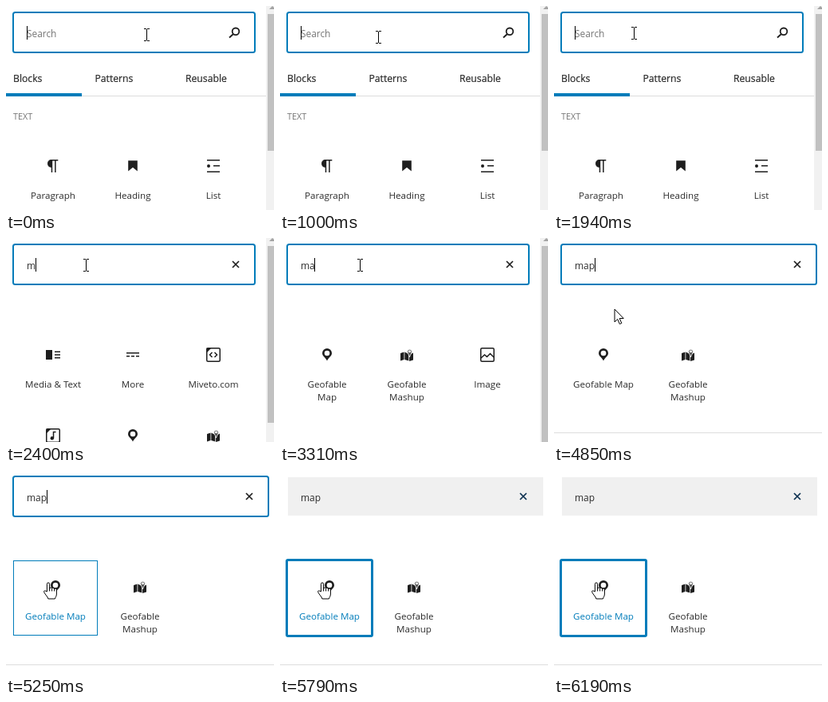
Recreate the animation shown at these times as an HTML page. Size 336 by 255 pixels, loop 6.99 s.

```html
<!DOCTYPE html>
<html lang="en">
<head>
<meta charset="utf-8">
<title>Block search</title>
<style>
  html, body { margin: 0; width: 100%; height: 100%; overflow: hidden; background: #fff; }
  svg { display: block; width: 336px; height: 255px; }
  text { font: 11.6px "Open Sans", "Noto Sans", sans-serif; fill: #2c2c2c; }
  .label { text-anchor: middle; }
  .input { font-size: 11.9px; }
  .tab { font-size: 12.2px; stroke: #1e1e1e; stroke-width: .2px; }
  .line { fill: none; stroke: #1e1e1e; stroke-width: 1.5px; }
  .hover .label { fill: #007cba; }
</style>
</head>
<body>
<svg id="stage" viewBox="0 0 336 255"></svg>
<script>
const LOOP = 6990, STEP = 67;
const TYPED = [[2400, "m"], [3000, "ma"], [3710, "map"]];
const CARET_X = [26, 37, 43, 51];
const CARET_OFF = [[330, 860], [1410, 1940], [4240, 4770], [5590, LOOP]];
const POINTER_LEAVES = 4450;
// time, x, y of the pointer's hot spot
const POINTER = [
  [0, 176, 36], [600, 176, 36], [1000, 123, 39], [1340, 101, 35], [1480, 100, 34],
  [POINTER_LEAVES, 100, 34], [5180, 54, 140], [5250, 53, 141], [LOOP, 53, 141]
];

const frame = '<rect class="line" x="3.75" y="3.75" width="16.5" height="16.5" rx="1.5"/>';
const foldedFrame = frame + '<path d="M3.5 3.5h6l-6 6z"/>';
const icons = {
  paragraph: '<path d="M18.3 4H9.9v-.1l-.9.2c-2.3.4-4 2.4-4 4.8s1.7 4.4 4 4.8l.7.1V20h1.5V5.5h2.9V20h1.5V5.5h2.7z"/>',
  heading: '<path d="M6.2 5.2v13.4l5.8-4.8 5.8 4.8V5.2z"/>',
  list: '<path d="M4 4h16v1.5H4zM12 11h8v1.5h-8zM4 18.5h16V20H4z"/><circle cx="6" cy="12" r="2"/>',
  media: '<path d="M3 6h8v12H3zM14 7.5h7V9h-7zM14 11.3h7v1.5h-7zM14 15h7v1.5h-7z"/>',
  more: '<path d="M4 9h16v1.5H4zM4 13h4v1.5H4zM10 13h4v1.5h-4zM16 13h4v1.5h-4z"/>',
  embed: foldedFrame + '<path class="line" d="M10.5 9l-3 3 3 3M13.5 9l3 3-3 3"/>',
  audio: foldedFrame + '<path class="line" d="M12.5 15.5v-8h3"/><circle cx="10.8" cy="15.3" r="2.2"/>',
  image: frame + '<path class="line" d="M4 16l4.5-4 3 2.5 4-4 4.5 4.5"/>',
  pin: '<path fill-rule="evenodd" d="M12 4a6 6 0 0 0-6 6c0 4 4 5 6 9.500 2-4.500 6-5.500 6-9.500a6 6 0 0 0-6-6zm0 2.700a3.300 3.300 0 1 1 0 6.600 3.300 3.300 0 0 1 0-6.600z"/>',
  map: '<path d="M4 10l4.500-1.500v9.500L4 19.500zM9.300 8.500l5 2.500v8.500l-5-1.500zM15.100 12l4.900-2.500v9L15.100 20z"/>' +
    '<path d="M15.500 15c-.5-3-2.800-4.500-2.800-7a2.800 2.800 0 0 1 5.600 0c0 2.500-2.300 4-2.800 7z" fill="#555" stroke="#fff" stroke-width=".8"/>' +
    '<circle cx="15.500" cy="7.800" r="1.500" fill="#fff"/>'
};

const item = (icon, x, y, ...lines) =>
  `<g fill="#1e1e1e" transform="translate(${x - 12} ${y - 12})">${icons[icon]}</g>` +
  lines.map((s, i) => `<text class="label" x="${x}" y="${y + 41 + 16 * i}">${s}</text>`).join("");
const group = (id, content) => `<g id="${id}">${content}</g>`;
const rect = (x, y, w, h, fill) => `<rect x="${x}" y="${y}" width="${w}" height="${h}" fill="${fill}"/>`;

document.getElementById("stage").innerHTML =
  rect(0, 0, 336, 255, "#fff") +
  group("home",
    '<text class="tab" x="9" y="95">Blocks</text><text class="tab" x="111.5" y="95">Patterns</text>' +
    '<text class="tab" x="225" y="95">Reusable</text>' +
    rect(0, 112, 327, 1, "#ddd") + rect(0, 109, 95, 4, "#007cba") +
    '<text x="9" y="142" style="font-size:10.8px;fill:#757575">TEXT</text>' +
    item("paragraph", 59, 200, "Paragraph") + item("heading", 159, 200, "Heading") + item("list", 260, 200, "List")) +
  group("resultsM",
    item("media", 59, 146, "Media &amp; Text") + item("more", 159, 146, "More") + item("embed", 260, 146, "Miveto.com") +
    item("audio", 59, 247) + item("pin", 159, 247) + item("map", 260, 247)) +
  group("resultsMa",
    item("pin", 59, 146, "Geofable", "Map") + item("map", 159, 146, "Geofable", "Mashup") + item("image", 260, 146, "Image")) +
  group("resultsMap",
    '<rect id="outline" fill="none" stroke="#007cba"/>' +
    group("found", item("pin", 62, 146, "Geofable Map")) + item("map", 168, 146, "Geofable", "Mashup") +
    rect(0, 243, 336, 1, "#ddd")) +
  group("scrollbar",
    rect(326, 0, 10, 255, "#f1f1f1") + '<path d="M330 4l4-4 4 4z" fill="#a3a3a3"/>' +
    '<rect id="thumb" x="328" y="10" width="8" fill="#c1c1c1"/>') +
  '<rect id="grayField" x="10" y="9" width="320" height="48" fill="#f0f0f0"/>' +
  '<rect id="field" x="9" y="8" height="50" rx="2.5" fill="none" stroke="#007cba" stroke-width="2"/>' +
  '<text id="placeholder" class="input" x="26" y="39" style="fill:#757575">Search</text>' +
  '<text id="query" class="input" x="26" y="39"></text>' +
  '<rect id="caret" y="25" width="1" height="17" fill="#000"/>' +
  group("lens", '<g class="line" style="stroke-width:1.8px"><circle cx="288" cy="31.8" r="4.3"/><path d="M285 35l-5 4.5"/></g>') +
  '<path id="clear" d="M-4-4L4 4M4-4L-4 4" stroke-width="1.7"/>' +
  group("beam", '<path d="M-3.5-7.5h3m1 0h3M0-7V7M-3.5 7.5h3m1 0h3" fill="none" stroke="#000"/>') +
  group("arrow", '<path d="M0 0v16l3.7-3.5 2.6 6 2.5-1-2.6-6h5z" fill="#fff" stroke="#000"/>') +
  group("hand", '<path transform="translate(-6.6 -1)" d="M5 12V2.5a1.6 1.6 0 0 1 3.2 0V8a1.6 1.6 0 0 1 3 .3 1.6 1.6 0 0 1 3 .6 1.5 1.5 0 0 1 2.8.8V15c0 3-1.5 4-2 6H6.500C6 18.500 2.500 15.500 1.300 12.700c-.7-1.600 1.200-2.500 2.300-1.300zM8.200 8v3.500M11.200 8.500v3M14.200 9v2.500" fill="#fff" stroke="#000"/>');

const $ = id => document.getElementById(id);
const show = (id, on) => { $(id).style.display = on ? "" : "none"; };
const set = (id, attrs) => { for (const k in attrs) $(id).setAttribute(k, attrs[k]); };
const clamp = v => Math.max(0, Math.min(1, v));

function pointerAt(t) {
  const i = Math.max(1, POINTER.findIndex(p => p[0] > t));
  const [a, b] = [POINTER[i - 1], POINTER[i]];
  const u = clamp((t - a[0]) / (b[0] - a[0]));
  const k = a[0] === POINTER_LEAVES ? u * u * (3 - 2 * u) : u;
  return [1, 2].map(n => Math.round(a[n] + (b[n] - a[n]) * k));
}

function draw(t) {
  const typed = TYPED.filter(([at]) => t >= at).length;
  const wide = typed === 3;
  const pressed = t < 5590 ? 0 : clamp((Math.floor((t - 5590) / STEP) + 1) / 4);

  ["home", "resultsM", "resultsMa", "resultsMap"].forEach((id, i) => show(id, i === typed));
  show("scrollbar", !wide);
  set("thumb", { height: [171, 221, 245, 245][typed] });

  set("field", { width: wide ? 320 : 303, opacity: 1 - pressed });
  set("grayField", { opacity: pressed });
  show("placeholder", !typed);
  $("query").textContent = typed ? TYPED[typed - 1][1] : "";
  set("caret", { x: CARET_X[typed] });
  show("caret", !CARET_OFF.some(([from, to]) => t >= from && t < to));
  show("lens", !typed);
  show("clear", typed);
  set("clear", { transform: `translate(${wide ? 305 : 288} 33)`, stroke: pressed ? "#0a3050" : "#1e1e1e" });

  const [x, y] = pointerAt(Math.floor(t / STEP + .1) * STEP);
  const hover = wide && y > 113;
  const shape = y < 58 ? "beam" : hover ? "hand" : "arrow";
  for (const id of ["beam", "arrow", "hand"]) show(id, id === shape);
  set(shape, { transform: `translate(${shape === "beam" ? x + .5 : x} ${y})` });

  show("outline", hover);
  set("found", { class: hover ? "hover" : "" });
  set("outline", {
    x: 9.5 - pressed, y: 113.5 - pressed, width: 105 + 2 * pressed, height: 93 + 2 * pressed,
    rx: 1.5 * pressed, "stroke-width": 1 + 2 * pressed
  });
}

const start = performance.now();
function tick() {
  draw((performance.now() - start) % LOOP);
  requestAnimationFrame(tick);
}
tick();
</script>
</body>
</html>
```
